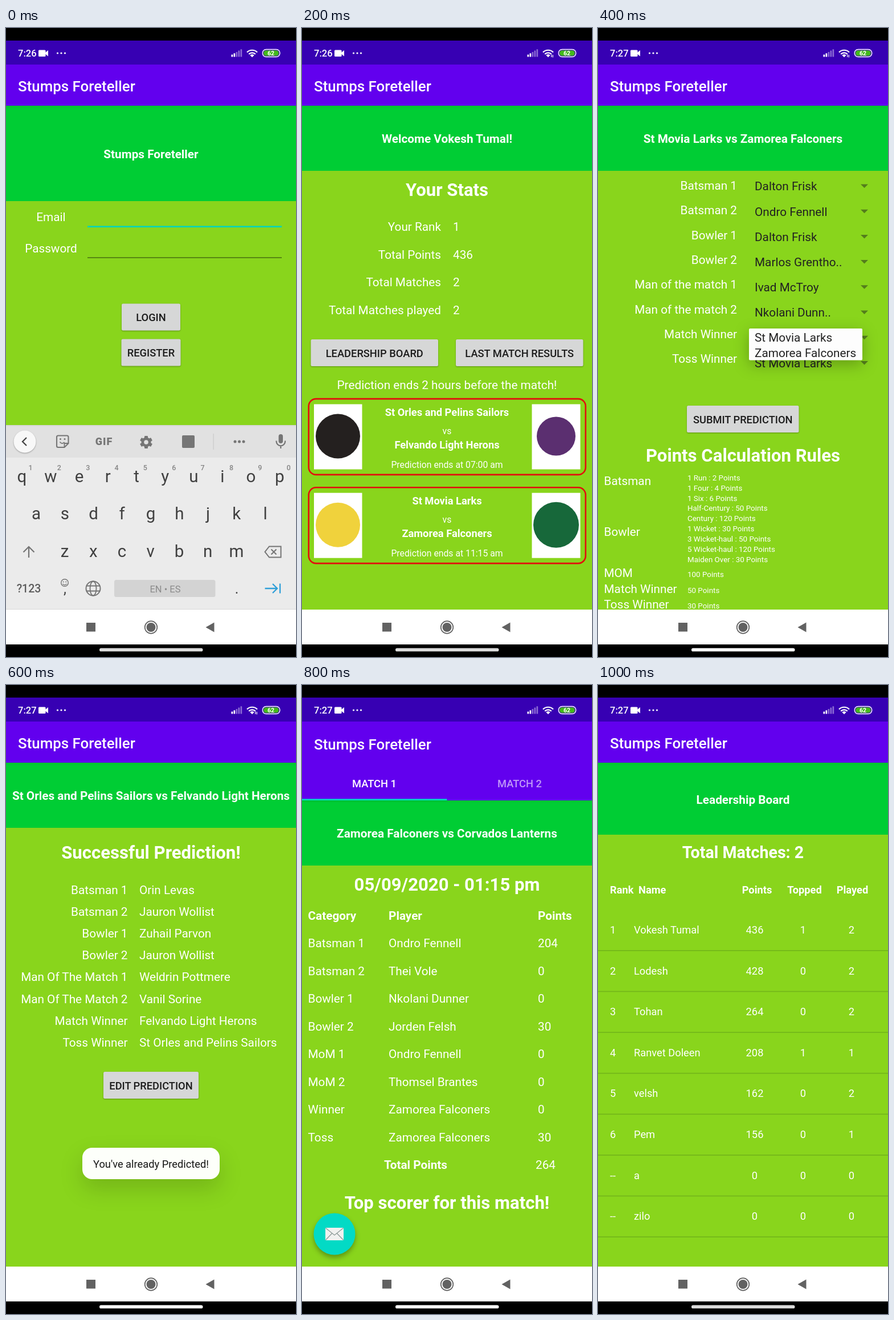
Animation of 509 by 1101 pixels, one loop 1.2 s. Source, as an HTML page:

```html
<!DOCTYPE html>
<html lang="en">
<head>
<meta charset="utf-8">
<title>Stumps Foreteller</title>
<style>
html, body { margin: 0; width: 100%; height: 100%; overflow: hidden; background: #000; }
svg { display: block; width: 100%; height: 100%; font-family: Roboto, sans-serif; }
.btn { filter: drop-shadow(0 1.2px 1.2px rgba(0, 0, 0, .32)); }
.popup { filter: drop-shadow(0 8px 13px rgba(0, 0, 0, .26)); }
.toast { filter: drop-shadow(0 17px 19px rgba(0, 0, 0, .15)); }
.fab { filter: drop-shadow(0 5px 4px rgba(0, 0, 0, .3)); }
</style>
</head>
<body>
<svg id="stage" viewBox="0 0 509 1101" xmlns="http://www.w3.org/2000/svg"></svg>
<script>
const MID = 254.5, STEP = 200;
const LIME = '#89d51c', GREEN = '#00cd34', TEAL = '#03dac5', PURPLE = '#6200ee', INK = '#222';
const XS = 13.4, S = 15.75, M = 18.3, L = 20.74, XL = 31.1;

const APP = 'Stumps Foreteller', USER = 'Vokesh Tumal';
const SAILORS = 'St Orles and Pelins Sailors', HERONS = 'Felvando Light Herons';
const LARKS = 'St Movia Larks', FALCONS = 'Zamorea Falconers', LANTERNS = 'Corvados Lanterns';

// y is the middle of the capitals
function text(x, y, str, size, { at = 'start', w = 400, fill = '#fff', more = '' } = {}) {
  return `<text x="${x}" y="${(y + size * .356).toFixed(2)}" font-size="${size}" font-weight="${w}" ` +
    `text-anchor="${at}" fill="${fill}" ${more}>${str}</text>`;
}
const mid = (y, str, size, w = 400) => text(MID, y, str, size, { at: 'middle', w });
const bold = (x, y, str, size, at) => text(x, y, str, size, { at, w: 700 });
const right = (x, y, str) => text(x, y, str, L, { at: 'end' });
const rect = (x0, y0, x1, y1, fill, r = 0, more = '') =>
  `<rect x="${x0}" y="${y0}" width="${x1 - x0}" height="${y1 - y0}" rx="${r}" fill="${fill}" ${more}/>`;
const dot = (x, y, r, fill, more = '') => `<circle cx="${x}" cy="${y}" r="${r}" fill="${fill}" ${more}/>`;
const fill = (d, color) => `<path d="${d}" fill="${color}"/>`;
const line = (d, color, w = 2, more = '') =>
  `<path d="${d}" fill="none" stroke="${color}" stroke-width="${w}" ${more}/>`;
const each = (list, fn) => list.map(fn).join('');

const button = (x0, y0, x1, str) => rect(x0, y0, x1, y0 + 47, '#d6d7d7', 2.5, 'class="btn"') +
  text((x0 + x1) / 2, y0 + 24, str, M, { at: 'middle', w: 500, fill: '#1c1c1c' });

const header = (y0, y1, textY, str) => rect(0, y0, 509, y1, GREEN) +
  rect(0, y0, 509, y0 + 5, 'url(#shade)') + mid(textY, str, L, 700);

function keyboard() {
  const grey = '#757575', key = '#404040', bar = '#e1e1e1';
  const row = (letters, x, y) => each([...letters], (c, i) =>
    `<text x="${x + i * 50.25}" y="${y}" font-size="29.5" text-anchor="middle" fill="${key}">${c}</text>`);
  const teeth = each([0, 60, 120], a =>
    rect(243, 714, 249, 736, grey, 1, `transform="rotate(${a} 246 725)"`));
  return rect(0, 695, 509, 752, bar) + rect(0, 752, 509, 1018, '#ebebeb') +
    rect(0, 695, 509, 698, 'url(#shade)') +
    // toolbar
    dot(33, 724, 19.5, '#f8f8f8', 'class="btn"') + line('M36 717l-7 7 7 7', '#444', 2.3) +
    line('M91.5 713.5h15.5q2.5 0 2.5 2.5v11l-7 7h-11q-2.5 0-2.5-2.5v-15.5q0-2.5 2.5-2.5z', grey, 2.1) +
    line('M102.5 734v-7h7M94.5 724.5q4 5 8 .5', grey, 1.8) +
    dot(95.5, 719.5, 1.5, grey) + dot(103, 719.5, 1.5, grey) +
    text(172, 723.5, 'GIF', 18, { at: 'middle', w: 900, fill: grey, more: 'letter-spacing="1"' }) +
    teeth + dot(246, 725, 8.5, grey) + dot(246, 725, 3.8, bar) +
    rect(309, 713, 331, 735, grey, 2) + rect(363.5, 710, 364.7, 738, '#c9c9c9') +
    each([402, 409.5, 417], x => dot(x, 724, 2.5, grey)) +
    rect(478.5, 711, 486, 727, grey, 3.75) +
    line('M474.5 722.5v1a7.75 7.75 0 0 0 15.5 0v-1M482.25 731v5', grey, 2.2) +
    // letters
    row('qwertyuiop', 28, 795) + row('asdfghjkl', 53, 860) + row('zxcvbnm', 103, 925.5) +
    each([...'1234567890'], (n, i) =>
      text(43 + i * 50.35, 770, n, 12.5, { at: 'middle', w: 500, fill: '#858585' })) +
    line('M40 927v-18M30.5 917.5l9.5-9.5 9.5 9.5', grey, 2.2) +
    line('M462 907.5h20.5v19h-20.5l-7.5-9.5zM465.5 912.5l9 9M474.5 912.5l-9 9', grey, 2) +
    // bottom row
    text(40, 981, '?123', 19.5, { at: 'middle', fill: '#5c5c5c', w: 500 }) +
    dot(103, 971, 6.3, 'none', `stroke="${grey}" stroke-width="1.4"`) +
    dot(100.7, 969.5, 1, grey) + dot(105.3, 969.5, 1, grey) + line('M99.5 973q3.5 3.5 7 0', grey, 1.2) +
    `<text x="103.5" y="990" font-size="25" text-anchor="middle" fill="${key}">,</text>` +
    dot(153, 981, 12.5, 'none', `stroke="${grey}" stroke-width="2"`) +
    `<ellipse cx="153" cy="981" rx="5.5" ry="12.5" fill="none" stroke="${grey}" stroke-width="1.8"/>` +
    line('M141.5 976.5h23M141.5 985.5h23', grey, 1.8) +
    rect(190, 966, 367.5, 996, '#d3d3d3', 3.5) +
    text(279.5, 982, 'EN • ES', 16.5, { at: 'middle', fill: '#8c8c8c' }) +
    `<text x="405" y="990" font-size="25" text-anchor="middle" fill="${key}">.</text>` +
    line('M454.5 981h21M468 973l8 8-8 8M481 972.5v17', '#2f9fd8', 2.3) +
    rect(0, 1017, 509, 1018.5, '#d9d9d9');
}

function login() {
  return header(136, 303, 221, APP) +
    text(79, 331, 'Email', L, { at: 'middle' }) + text(79, 386, 'Password', L, { at: 'middle' }) +
    rect(143, 346.4, 484, 349, '#06d5b8') + rect(143, 401.3, 484, 402.7, '#42690f') +
    button(203, 482.5, 306, 'LOGIN') + button(202.5, 544.5, 306.5, 'REGISTER') + keyboard();
}

function card(y, a, b, time, colorA, colorB, rB) {
  return rect(11.7, y - .4, 497.8, y + 132.4, 'none', 13, 'stroke="#e30d0d" stroke-width="2.6"') +
    rect(21, y + 9, 105.5, y + 123, '#fff') + dot(63, y + 65, 39, colorA) +
    rect(403.5, y + 9, 488.5, y + 123, '#fff') + dot(446, y + 65, rB, colorB) +
    mid(y + 23, a, M, 700) + mid(y + 56, 'vs', S) + mid(y + 79.5, b, M, 700) +
    mid(y + 115, 'Prediction ends at ' + time, S);
}

function stats() {
  const rows = [['Your Rank', 1], ['Total Points', 436], ['Total Matches', 2], ['Total Matches played', 2]];
  return header(136, 250, 194, `Welcome ${USER}!`) + mid(283, 'Your Stats', XL, 700) +
    each(rows, ([k, v], i) => right(244, 348 + i * 48.5, k) + text(265, 348 + i * 48.5, v, L)) +
    button(15.5, 545, 239, 'LEADERSHIP BOARD') + button(270, 545, 493.5, 'LAST MATCH RESULTS') +
    mid(625, 'Prediction ends 2 hours before the match!', L) +
    card(649.5, SAILORS, HERONS, '07:00 am', '#24201f', '#5b2f70', 34) +
    card(804.7, LARKS, FALCONS, '11:15 am', '#f0d23c', '#17683a', 40);
}

function predict() {
  const rows = [['Batsman 1', 'Dalton Frisk'], ['Batsman 2', 'Ondro Fennell'], ['Bowler 1', 'Dalton Frisk'],
    ['Bowler 2', 'Marlos Grentho..'], ['Man of the match 1', 'Ivad McTroy'],
    ['Man of the match 2', 'Nkolani Dunn..'], ['Match Winner', LARKS], ['Toss Winner', LARKS]];
  const rules = ['1 Run : 2 Points', '1 Four : 4 Points', '1 Six : 6 Points', 'Half-Century : 50 Points',
    'Century : 120 Points', '1 Wicket : 30 Points', '3 Wicket-haul : 50 Points',
    '5 Wicket-haul : 120 Points', 'Maiden Over : 30 Points'];
  const heads = [['Batsman', 793], ['Bowler', 882], ['MOM', 954], ['Match Winner', 981.5], ['Toss Winner', 1009]];
  return header(136, 250, 194, `${LARKS} vs ${FALCONS}`) +
    each(rows, ([k, v], i) => right(244, 275.5 + i * 43.35, k) +
      text(275, 277 + i * 44.2, v, L, { fill: INK }) +
      fill(`M461 ${273.5 + i * 44.2}h13l-6.5 6.5z`, '#547d1c')) +
    rect(265, 526, 464, 581.5, '#fdfdfd', 2, 'class="popup"') +
    text(275, 541.5, LARKS, L, { fill: INK }) + text(275, 569, FALCONS, L, { fill: INK }) +
    button(156, 661, 352.5, 'SUBMIT PREDICTION') + mid(748, 'Points Calculation Rules', XL, 700) +
    each(heads, ([s, y]) => text(10.5, y, s, L)) +
    each(rules, (s, i) => text(157, 787 + i * 17.9, s, XS)) +
    each([100, 50, 30], (n, i) => text(157, 956.5 + i * 27.6, n + ' Points', XS));
}

function success() {
  const rows = [['Batsman 1', 'Orin Levas'], ['Batsman 2', 'Jauron Wollist'], ['Bowler 1', 'Zuhail Parvon'],
    ['Bowler 2', 'Jauron Wollist'], ['Man Of The Match 1', 'Weldrin Pottmere'],
    ['Man Of The Match 2', 'Vanil Sorine'], ['Match Winner', HERONS], ['Toss Winner', SAILORS]];
  return header(136, 250, 194, `${SAILORS} vs ${HERONS}`) + mid(293, 'Successful Prediction!', XL, 700) +
    each(rows, ([k, v], i) => right(213.5, 358.5 + i * 38.15, k) + text(234, 358.5 + i * 38.15, v, L)) +
    button(171, 677, 338, 'EDIT PREDICTION') +
    rect(134, 810, 375, 865, '#fdfffa', 17, 'class="toast"') +
    text(MID, 838, "You've already Predicted!", M, { at: 'middle', fill: '#161616' });
}

function results() {
  const rows = [['Batsman 1', 'Ondro Fennell', 204], ['Batsman 2', 'Thei Vole', 0], ['Bowler 1', 'Nkolani Dunner', 0],
    ['Bowler 2', 'Jorden Felsh', 30], ['MoM 1', 'Ondro Fennell', 0], ['MoM 2', 'Thomsel Brantes', 0],
    ['Winner', FALCONS, 0], ['Toss', FALCONS, 30]];
  const xs = [10.5, 152, 414];
  const tab = (x, s, color) => text(x, 172, s, M, { at: 'middle', w: 500, fill: color });
  return rect(0, 136, 509, 202, PURPLE) + tab(127, 'MATCH 1', '#fff') + tab(382, 'MATCH 2', '#c099f8') +
    header(202, 316, 260, `${FALCONS} vs ${LANTERNS}`) + rect(0, 199.3, MID, 202, TEAL) +
    mid(349, '05/09/2020 - 01:15 pm', XL, 700) +
    each(['Category', 'Player', 'Points'], (s, i) => bold(xs[i], 404, s, L)) +
    each(rows, (row, j) => each(row, (s, i) => text(xs[i], 452 + j * 48.5, s, L))) +
    bold(144, 840, 'Total Points', L) + text(410, 840, 264, L) +
    mid(906, 'Top scorer for this match!', XL, 700) +
    dot(57, 961, 36.5, TEAL, 'class="fab"') + rect(41, 950, 73, 972, '#f1f1f0', 1) +
    line('M41.5 950.5l15.5 12.5 15.5-12.5M41.5 971.5l11-11.5M72.5 971.5l-11-11.5', '#8d9a98', 1.3);
}

function board() {
  const rows = [[1, USER, 436, 1, 2], [2, 'Lodesh', 428, 0, 2], [3, 'Tohan', 264, 0, 2],
    [4, 'Ranvet Doleen', 208, 1, 1], [5, 'velsh', 162, 0, 2], [6, 'Pem', 156, 0, 1],
    ['--', 'a', 0, 0, 0], ['--', 'zilo', 0, 0, 0]];
  const xs = [21, 63, 275, 360, 445], at = i => i < 2 ? 'start' : 'middle';
  const heads = [[21, 'Rank'], [71, 'Name'], [279, 'Points'], [362.5, 'Topped'], [446.5, 'Played']];
  return header(136, 262, 200.5, 'Leadership Board') + mid(293, 'Total Matches: 2', 28.6, 700) +
    each(heads, ([x, s], i) => bold(x, 358, s, M, at(i))) +
    each(rows, (row, j) => rect(0, 464 + j * 71.6, 509, 465.7 + j * 71.6, '#73b61a') +
      each(row, (s, i) => text(xs[i], 428.5 + j * 71.6, s, M, { at: at(i) })));
}

function chrome() {
  const grey = '#626262';
  return rect(0, 0, 509, 22, '#000') + rect(0, 22, 509, 64, '#3700b3') +
    text(21, 44, '<tspan id="clock"></tspan>', 16.5, { w: 500 }) +
    rect(57, 38.5, 69.5, 50, '#fff', 1.5) + fill('M69 43l5-4v10.5l-5-4z', '#fff') +
    each([90.5, 97, 103.5], x => dot(x, 44, 1.6, '#fff')) +
    each([0, 1, 2, 3, 4], i => rect(395.5 + i * 4, 46.5 - i * 2.3, 398.2 + i * 4, 50.5,
      i < 2 ? '#fff' : '#8a6bd3', .5)) +
    line('M423 42.5a12.7 12.7 0 0 1 18 0M426.2 45.7a8.2 8.2 0 0 1 11.6 0', '#fff', 2.2) +
    fill('M428.3 47.5a5.2 5.2 0 0 1 7.4 0l-3.7 3.8z', '#fff') +
    `<g id="traffic">${line('M437.8 51v-4.5M440.3 47v4.5', '#fff', 1.2)}</g>` +
    rect(452, 39.2, 478.8, 48.8, '#43b81c', 4.5) +
    rect(450.3, 37.5, 480.7, 50.5, 'none', 6.3, 'stroke="#fff" stroke-width="1.4"') +
    text(465, 44, '62', 10.5, { at: 'middle', w: 700 }) +
    rect(0, 1018, 509, 1079, '#fff') + rect(0, 1079, 509, 1101, '#000') +
    rect(141, 1041, 157, 1056.5, grey) +
    dot(MID, 1049, 10.8, 'none', `stroke="${grey}" stroke-width="1.7"`) + dot(MID, 1049, 8, grey) +
    fill('M350.5 1049l15-8.5v17z', grey) +
    rect(164, 1085.5, 345.5, 1091.3, '#fff', 2.9, 'id="pill"');
}

const scenes = [login, stats, predict, success, results, board];
const stage = document.getElementById('stage');
stage.innerHTML =
  `<defs><linearGradient id="shade" x2="0" y2="1"><stop stop-opacity=".06"/><stop offset="1" stop-opacity="0"/></linearGradient></defs>` +
  rect(0, 0, 509, 1101, LIME) + rect(0, 64, 509, 136, PURPLE) +
  `<g id="title">${text(21, 101.5, APP, 25.9, { w: 500 })}</g>` +
  each(scenes, scene => `<g class="scene">${scene()}</g>`) + chrome();

const $ = id => document.getElementById(id);
const groups = stage.querySelectorAll('.scene');
const show = (el, on) => el.setAttribute('visibility', on ? 'visible' : 'hidden');
let shown = -1;

function draw(time) {
  const n = Math.floor(time / STEP) % scenes.length;
  if (n === shown) return;
  shown = n;
  groups.forEach((g, i) => show(g, i === n));
  show($('traffic'), n > 0 && n < 4);
  $('clock').textContent = n < 2 ? '7:26' : '7:27';
  $('title').setAttribute('transform', `translate(0 ${n === 4 ? 2 : 0})`);
  $('pill').setAttribute('fill', n > 1 && n < 5 ? '#fff' : '#dcdcdc');
}

const start = performance.now();
function tick() {
  draw(performance.now() - start);
  requestAnimationFrame(tick);
}
tick();
</script>
</body>
</html>
```
